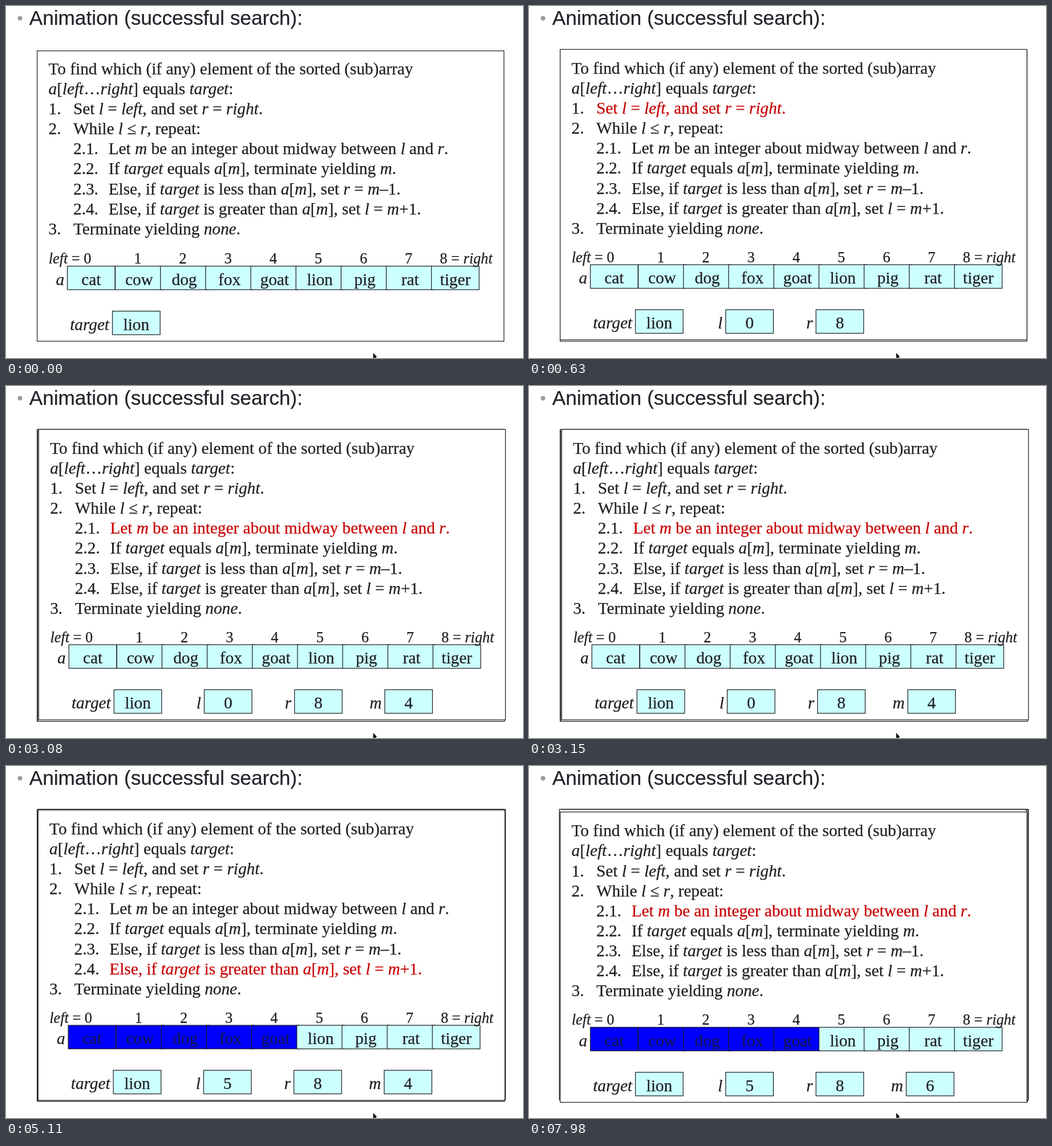
An HTML page with a canvas that plays this animation: 906 by 618 pixels, repeating every 8000 ms.

```html
<!DOCTYPE html>
<html lang="en">
<head>
<meta charset="utf-8">
<title>Binary search</title>
<style>
html, body { margin: 0; width: 100%; height: 100%; overflow: hidden; background: #fff; }
canvas { display: block; width: 906px; height: 618px; }
</style>
</head>
<body>
<canvas id="stage"></canvas>
<script>
const W = 906, H = 618, LOOP = 8000;
const INK = '#1f1f24', RED = '#c80000', CYAN = '#ccffff', BLUE = '#0000ff';
const SERIF = '"Liberation Serif", "Times New Roman", serif';
const SANS = '"Liberation Sans", Arial, sans-serif';
const BODY = 29.25, SMALL = 26.3;
const CELL_W = 83.6, CELL_H = 41.4;

const canvas = document.getElementById('stage');
const ctx = canvas.getContext('2d');
const dpr = window.devicePixelRatio || 1;
canvas.width = W * dpr;
canvas.height = H * dpr;
ctx.scale(dpr, dpr);

// Asterisks switch italics on and off.
const LINES = [
  { x: 74.5, text: 'To find which (if any) element of the sorted (sub)array' },
  { x: 74.5, text: '*a*[*left*…*right*] equals *target*:' },
  { num: '1.', nx: 74.5, x: 118, text: 'Set *l* = *left*, and set *r* = *right*.' },
  { num: '2.', nx: 74.5, x: 118, text: 'While *l* ≤ *r*, repeat', tail: ':' },
  { num: '2.1.', nx: 118, x: 179.7, text: 'Let *m* be an integer about midway between *l* and *r*.' },
  { num: '2.2.', nx: 118, x: 179.7, text: 'If *target* equals *a*[*m*], terminate yielding *m*.' },
  { num: '2.3.', nx: 118, x: 179.7, text: 'Else, if *target* is less than *a*[*m*], set *r* = *m*–1.' },
  { num: '2.4.', nx: 118, x: 179.7, text: 'Else, if *target* is greater than *a*[*m*], set *l* = *m*+1.' },
  { num: '3.', nx: 74.5, x: 118, text: 'Terminate yielding *none*.' }
];
const WORDS = ['cat', 'cow', 'dog', 'fox', 'goat', 'lion', 'pig', 'rat', 'tiger'];

// Each step lays a new panel over the earlier ones.
const STEPS = [
  { at: 0, dx: 0, dy: 2.5, lift: 1.5 },
  { at: 560, dx: 0, dy: 0, hot: 2, l: 0, r: 8 },
  { at: 1890, dx: 1.2, dy: 2.6, hot: 3, l: 0, r: 8 },
  { at: 3080, dx: 2.7, dy: 0, hot: 4, l: 0, r: 8, m: 4 },
  { at: 4970, dx: 1.6, dy: 1, hot: 7, l: 5, r: 8, m: 4, gone: 5 },
  { at: 6650, dx: -1.4, dy: 0, hot: 3, l: 5, r: 8, m: 4, gone: 5 },
  { at: 7980, dx: 0, dy: 4.5, hot: 4, l: 5, r: 8, m: 6, gone: 5 }
];

function setFont(size, italic) {
  ctx.font = `${italic ? 'italic ' : ''}${size}px ${SERIF}`;
}

// A hairline outline gives the letters a little more weight.
function ink(text, x, y, color) {
  ctx.fillStyle = ctx.strokeStyle = color;
  ctx.lineWidth = 0.25;
  ctx.fillText(text, x, y);
  ctx.strokeText(text, x, y);
}

function rich(text, x, y, size, color) {
  ctx.textAlign = 'left';
  text.split('*').forEach((part, i) => {
    setFont(size, i % 2);
    ink(part, x, y, color);
    x += ctx.measureText(part).width;
  });
  return x;
}

function box(x, y, w, h, fill) {
  ctx.fillStyle = fill;
  ctx.fillRect(x, y, w, h);
  ctx.strokeStyle = '#222226';
  ctx.lineWidth = 1.25;
  ctx.strokeRect(x, y, w, h);
}

function cell(x, y, text, off) {
  box(x, y, CELL_W, CELL_H, off ? BLUE : CYAN);
  ctx.textAlign = 'center';
  setFont(BODY);
  ink(text, x + CELL_W / 2, y + 33, off ? '#181854' : INK);
}

function label(text, x, y) {
  ctx.textAlign = 'right';
  setFont(BODY, true);
  ink(text, x - 5.5, y + 33, INK);
}

function panel(s) {
  ctx.save();
  ctx.translate(s.dx, s.dy);
  box(54.6, 76.2, 818, 509.8, '#fff');

  LINES.forEach((line, i) => {
    const y = 118.7 + 35.15 * i - (s.lift || 0);
    if (line.num) rich(line.num, line.nx, y, BODY, INK);
    const end = rich(line.text, line.x, y, BODY, s.hot === i ? RED : INK);
    if (line.tail) rich(line.tail, end, y, BODY, INK);
  });

  const rowY = 454.2, varY = 533.2, headY = 449.8;
  label('a', 107.5, rowY);
  WORDS.forEach((word, i) => {
    const x = i ? 191.5 + 79.15 * (i - 1) : 107.5;
    cell(x, rowY, word, i < s.gone);
  });

  rich('*left* = 0', 74.7, headY, SMALL, INK);
  for (let i = 1; i < 8; i++) {
    rich(String(i), 224.2 + 79.15 * (i - 1), headY, SMALL, INK);
  }
  rich('8 = *right*', 760.3, headY, SMALL, INK);

  [['target', 'lion'], ['l', s.l], ['r', s.r], ['m', s.m]].forEach(([name, value], i) => {
    if (value === undefined) return;
    const x = 186.5 + 158.2 * i;
    label(name, x, varY);
    cell(x, varY, value);
  });
  ctx.restore();
}

function heading() {
  ctx.fillStyle = '#9c9c9c';
  ctx.beginPath();
  ctx.arc(24.5, 21.5, 4, 0, Math.PI * 2);
  ctx.fill();
  ctx.textAlign = 'left';
  ctx.font = `35.2px ${SANS}`;
  ink('Animation (successful search):', 40.7, 33, '#23232b');
}

function pointer() {
  const pts = [[0, 0], [0, 12], [2.8, 9.4], [4.6, 13.5], [6.4, 12.7], [4.7, 8.7], [8, 8.4]];
  ctx.beginPath();
  pts.forEach(([x, y]) => ctx.lineTo(643.5 + x * 0.85, 609 + y * 0.85));
  ctx.closePath();
  ctx.fillStyle = '#000';
  ctx.fill();
}

const start = performance.now();
let shown = -1;

function draw(now) {
  const t = (now - start) % LOOP;
  const current = STEPS.filter(s => s.at <= t).length - 1;
  if (current === shown) return;
  shown = current;
  ctx.fillStyle = '#fff';
  ctx.fillRect(0, 0, W, H);
  heading();
  STEPS.slice(0, current + 1).forEach(panel);
  pointer();
}

function tick() {
  draw(performance.now());
  requestAnimationFrame(tick);
}
tick();
</script>
</body>
</html>
```
